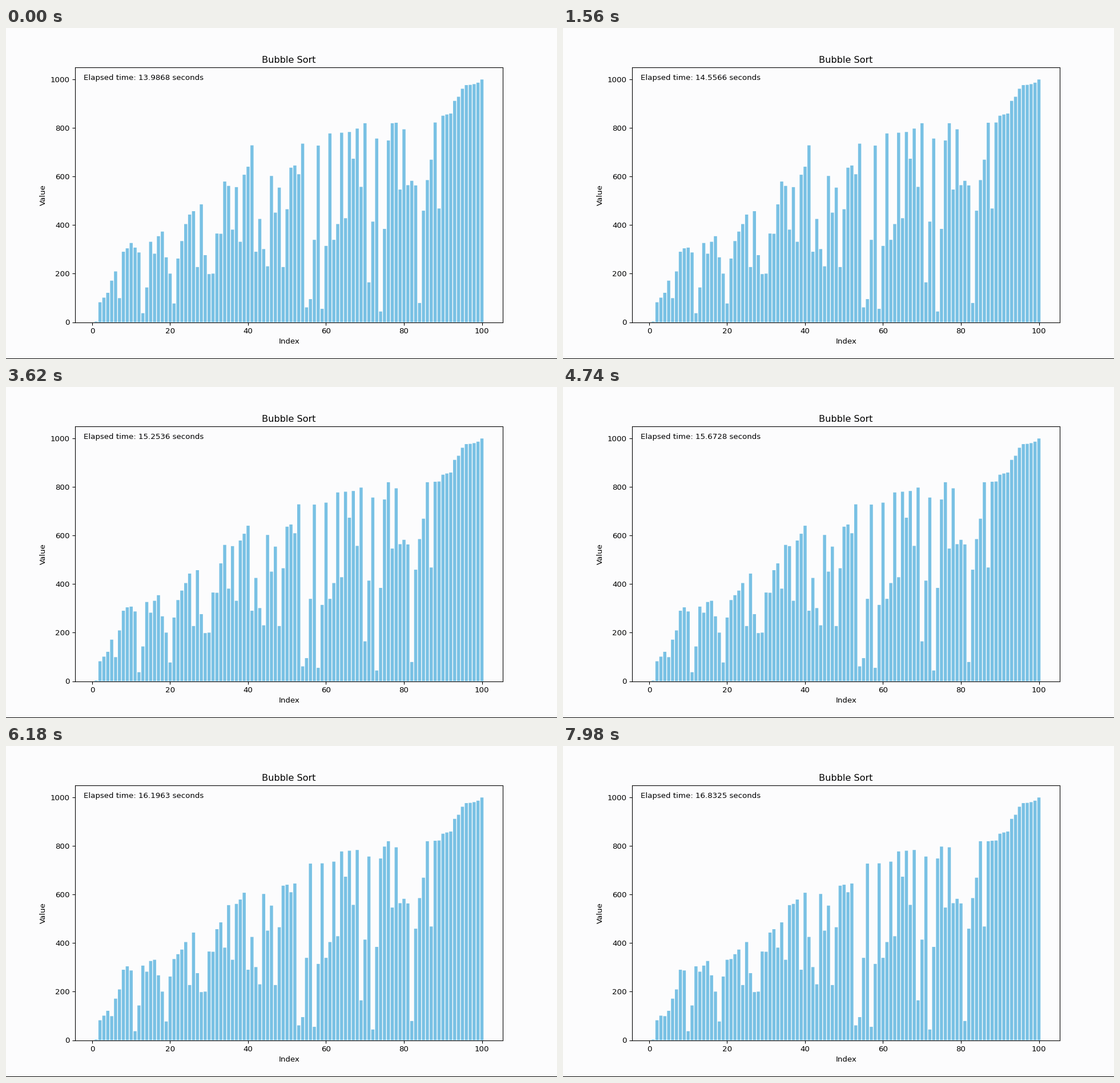
A matplotlib script for the animation above (8000 ms loop, 965 px wide and 580 px high).

```python
import numpy as np
import matplotlib.pyplot as plt
from matplotlib.animation import FuncAnimation
from matplotlib.collections import PolyCollection
from matplotlib.patches import Rectangle

W, H, DPI = 965, 580, 100
TICK, FRAMES = 20, 400
PAPER, BAR = "#fcfcfd", "#79c1e4"

START = [
    3, 82, 101, 121, 171, 209, 99, 290, 304, 326,
    307, 287, 37, 143, 331, 282, 354, 373, 267, 200,
    77, 262, 334, 404, 443, 457, 227, 485, 276, 198,
    200, 365, 364, 579, 561, 381, 556, 331, 607, 640,
    728, 290, 425, 301, 230, 602, 451, 554, 227, 465,
    636, 645, 609, 735, 61, 95, 339, 727, 55, 314,
    777, 339, 404, 780, 428, 783, 673, 797, 557, 819,
    164, 414, 756, 44, 384, 748, 819, 821, 546, 794,
    564, 582, 563, 79, 459, 585, 669, 822, 468, 850,
    855, 859, 911, 928, 961, 976, 977, 980, 986, 999,
]
N = len(START)

# Pace of the sort: picture step, comparisons done, seconds elapsed
STEPS = [0, 34, 55, 77, 119, 149, 171]
COMPARED = [1110, 1154, 1181, 1210, 1267, 1304, 1334]
SECONDS = [13.9868, 14.5566, 14.9046, 15.2536, 15.9776, 16.4537, 16.8325]


def sort_states(first, last):
    """Bubble sort states, one after each comparison from first to last."""
    values = list(START)
    states = {first: np.array(values)}
    count = 0
    for done in range(N - 1):
        for j in range(N - 1 - done):
            count += 1
            if count <= first:
                continue
            if values[j] > values[j + 1]:
                values[j], values[j + 1] = values[j + 1], values[j]
            states[count] = np.array(values)
            if count == last:
                return states
    return states


STATES = sort_states(COMPARED[0], COMPARED[-1])


def step_at(ms):
    """Pictures come in threes, held for 20, 20 and 100 ms."""
    group, rest = divmod(ms + 20, 140)
    return 3 * group + min(rest // 20, 2) - 1


def bar_shapes(values):
    x = np.arange(1, N + 1)
    left, right, base = x - 0.4, x + 0.4, np.zeros(N)
    xs = np.stack([left, left, right, right], axis=1)
    ys = np.stack([base, values, values, base], axis=1)
    return np.stack([xs, ys], axis=2)


plt.rcParams.update({
    "font.family": "DejaVu Sans",
    "font.size": 9.67,
    "axes.titlesize": 11.6,
    "axes.titlepad": 5.8,
    "axes.linewidth": 0.78,
    "axes.labelpad": 3.87,
    "xtick.major.size": 3.4,
    "ytick.major.size": 3.4,
    "xtick.major.pad": 3.4,
    "ytick.major.pad": 3.4,
    "toolbar": "None",
})

fig = plt.figure(figsize=(W / DPI, H / DPI), dpi=DPI, facecolor=PAPER)
ax = fig.add_axes([121 / W, 64.5 / H, 749.3 / W, 446.5 / H], facecolor=PAPER)
ax.set_xlim(0.6 - 4.99, 100.4 + 4.99)
ax.set_ylim(0, 1.05 * max(START))
ax.set_xticks(range(0, 101, 20))
ax.set_yticks(range(0, 1001, 200))
ax.set_title("Bubble Sort")
ax.set_xlabel("Index")
ax.set_ylabel("Value")

bars = PolyCollection(bar_shapes(STATES[COMPARED[0]]), facecolors=BAR,
                      edgecolors="none", snap=False)
ax.add_collection(bars, autolim=False)
clock = ax.text(0.02, 0.95, "", transform=ax.transAxes)
fig.add_artist(Rectangle((0, 0), 1, 1 / H, transform=fig.transFigure,
                         facecolor="black", linewidth=0))


def draw(frame):
    step = step_at(frame * TICK)
    count = int(round(np.interp(step, STEPS, COMPARED)))
    bars.set_verts(bar_shapes(STATES[count]))
    elapsed = np.interp(count, COMPARED, SECONDS)
    clock.set_text(f"Elapsed time: {elapsed:.4f} seconds")
    return bars, clock


anim = FuncAnimation(fig, draw, frames=FRAMES, interval=TICK,
                     init_func=lambda: draw(0), repeat=True)
plt.show()
```
